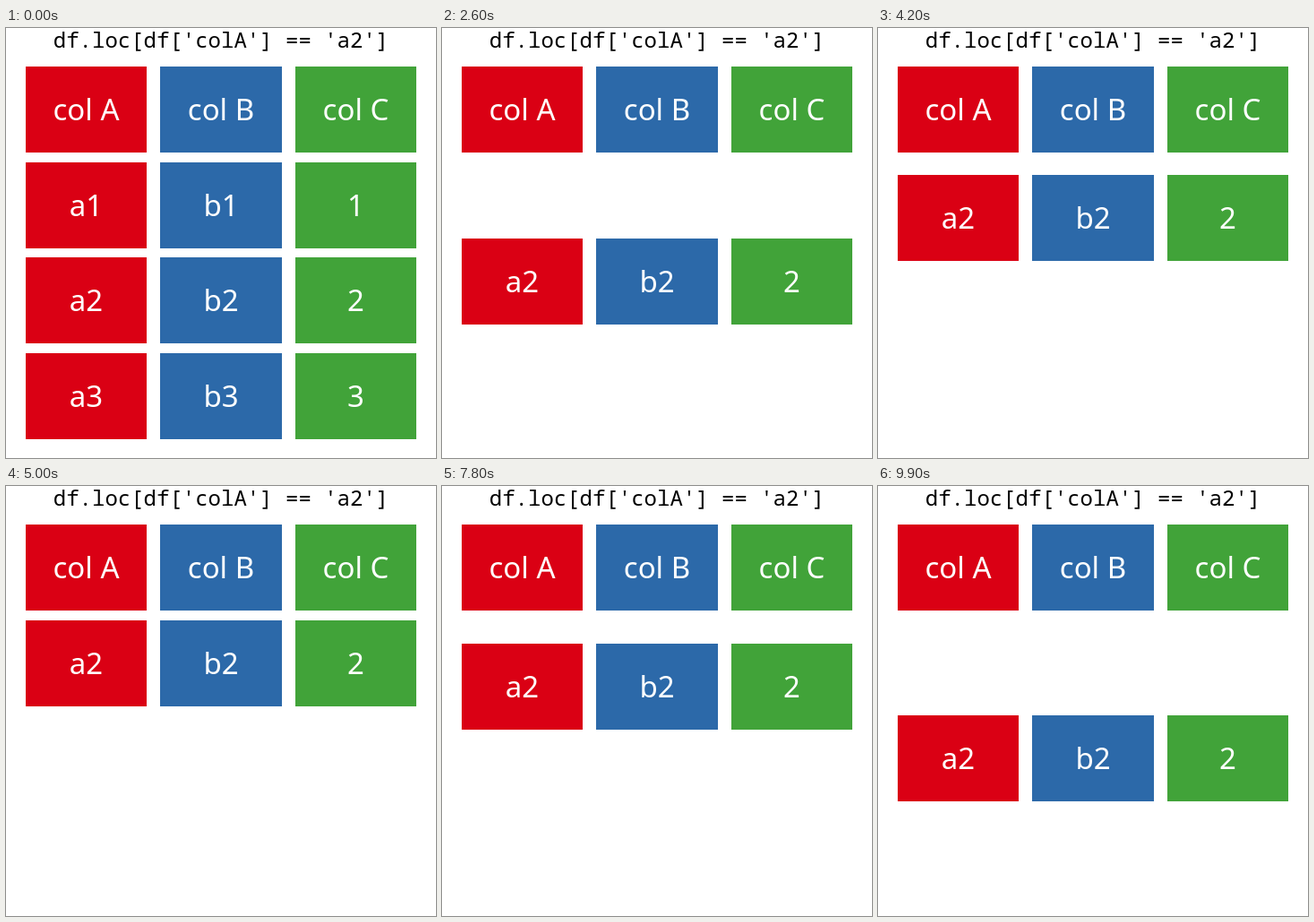
Animation, 480 px wide and 480 px high, one loop 10 s. Source, as an HTML page:

```html
<!DOCTYPE html>
<html lang="en">
<head>
<meta charset="utf-8">
<title>Row filter</title>
<style>
  html, body { margin: 0; width: 100%; height: 100%; overflow: hidden; background: #fff; }
  svg { display: block; width: 100vw; height: 100vh; }
  text { text-anchor: middle; white-space: pre; }
  .code { font: 24px "Noto Sans Mono", "DejaVu Sans Mono", monospace; fill: #000; }
  .cell { font: 33px "Noto Sans", "Open Sans", sans-serif; fill: #fff; }
</style>
</head>
<body>
<svg id="stage" viewBox="0 0 480 480">
  <text class="code" x="240" y="22">df.loc[df['colA'] == 'a2']</text>
</svg>
<script>
  const LOOP = 10000, STEP = 100, TOP = 149.7, PITCH = 106.6;
  const columns = [
    { x: 22, w: 135, fill: '#da0014' },
    { x: 172, w: 136, fill: '#2c69a9' },
    { x: 323, w: 135, fill: '#41a339' }
  ];
  const stage = document.getElementById('stage');

  function add(parent, name, attrs, text) {
    const el = document.createElementNS('http://www.w3.org/2000/svg', name);
    for (const key in attrs) el.setAttribute(key, attrs[key]);
    if (text) el.textContent = text;
    return parent.appendChild(el);
  }

  function place(row, y) {
    row.setAttribute('transform', `translate(0 ${Math.round(y)})`);
  }

  function addRow(labels, y) {
    const row = add(stage, 'g', {});
    columns.forEach((c, i) => {
      add(row, 'rect', { x: c.x, y: 0, width: c.w, height: 96, fill: c.fill });
      add(row, 'text', { class: 'cell', x: c.x + c.w / 2, y: 60 }, labels[i]);
    });
    place(row, y);
    return row;
  }

  addRow(['col A', 'col B', 'col C'], 43);
  const first = addRow(['a1', 'b1', '1'], TOP);
  const match = addRow(['a2', 'b2', '2'], TOP + PITCH);
  const last = addRow(['a3', 'b3', '3'], TOP + 2 * PITCH);

  // Sine ease in and out between two times
  function ease(t, from, to) {
    const k = Math.min(1, Math.max(0, (t - from) / (to - from)));
    return (1 - Math.cos(Math.PI * k)) / 2;
  }

  function draw(now) {
    const t = Math.floor((now + 0.5) / STEP) * STEP % LOOP;
    const shown = t < 1700 ? 'visible' : 'hidden';
    first.setAttribute('visibility', shown);
    last.setAttribute('visibility', shown);
    const lift = t < 1700 ? 0 : ease(t, 1600, 5000) - ease(t, 6700, 10000);
    place(match, TOP + PITCH * (1 - lift));
  }

  function tick(now) {
    draw(now);
    requestAnimationFrame(tick);
  }

  draw(0);
  requestAnimationFrame(tick);
</script>
</body>
</html>
```
